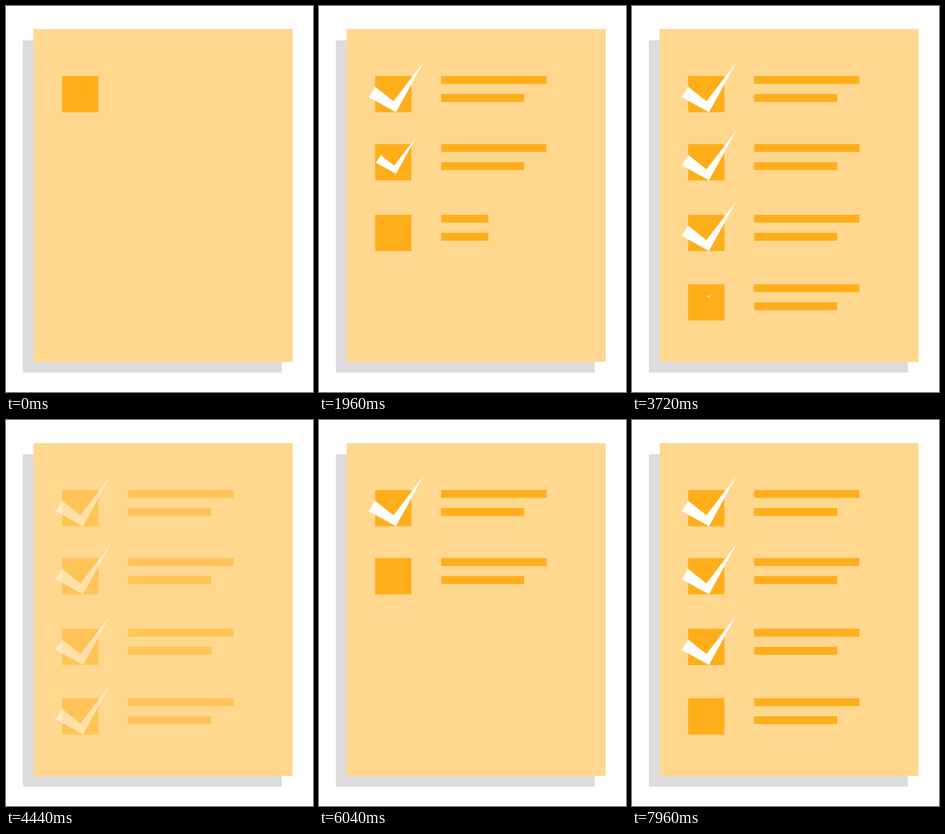
Animation of 600x754 px, one loop 8 s. Source, as an HTML page with a canvas:

```html
<!DOCTYPE html>
<html lang="en">
<head>
<meta charset="utf-8">
<title>Checklist</title>
<style>
  html, body { margin: 0; width: 100%; height: 100%; overflow: hidden; background: #fff; }
  canvas { display: block; width: 600px; height: 754px; }
</style>
</head>
<body>
<canvas id="stage" width="600" height="754"></canvas>
<script>
const ctx = document.getElementById('stage').getContext('2d');

const LOOP = 8000, CYCLE = 4750, STEP = 40;
const PAPER = '#ffd78f', ACCENT = '#ffae1b', SHADOW = '#dddbde';
const WIPE = 333, POP = 440;
const FADE_START = 4353, FADE = 167;

// y: top of the row; bars and check: when each starts within a cycle
const rows = [
  { y: 136.7, bars: 22, check: 853 },
  { y: 269.8, bars: 930, check: 1728 },
  { y: 407.8, bars: 1805, check: 2613 },
  { y: 543.5, bars: 2850, check: 3695 }
];

// Check mark, relative to its centre
const CHECK_X = 150.7, CHECK_Y = 21.8;
const checkShape = [[-53.7, 19.5], [-40.7, -0.5], [-5.2, 27.6], [53.6, -49], [-0.2, 49]];

const clamp = v => Math.min(1, Math.max(0, v));
const easeInOut = p => p * p * (3 - 2 * p);
const easeOut = p => Math.sin(p * Math.PI / 2);

function rect(x, y, w, h, color) {
  ctx.fillStyle = color;
  ctx.fillRect(x, y, w, h);
}

function drawCheck(y, scale) {
  ctx.beginPath();
  for (const [px, py] of checkShape) {
    ctx.lineTo(CHECK_X + px * scale, y + CHECK_Y + py * scale);
  }
  ctx.fillStyle = '#fff';
  ctx.fill();
}

function drawRow({ y, bars, check }, t) {
  if (t < bars - 22) return;
  rect(109.7, y, 70.8, 70.8, ACCENT);

  const wipe = 205.8 * easeInOut(clamp((t - bars) / WIPE));
  rect(238.7, y, wipe, 15.4, ACCENT);
  rect(238.7, y + 35.3, Math.min(wipe, 162.4), 15.4, ACCENT);

  const scale = easeOut(clamp((t - check) / POP));
  if (scale > 0) drawCheck(y, scale);
}

function draw(time) {
  const t = time % CYCLE;
  ctx.globalAlpha = 1;
  rect(0, 0, 600, 754, '#fff');
  rect(33, 67, 506, 649, SHADOW);
  rect(54, 45, 506, 650, PAPER);

  ctx.globalAlpha = 1 - clamp((t - FADE_START) / FADE);
  for (const row of rows) drawRow(row, t);
}

const start = performance.now();
function tick() {
  const time = (performance.now() - start) % LOOP;
  draw(Math.floor(time / STEP) * STEP);
  requestAnimationFrame(tick);
}
tick();
</script>
</body>
</html>
```
